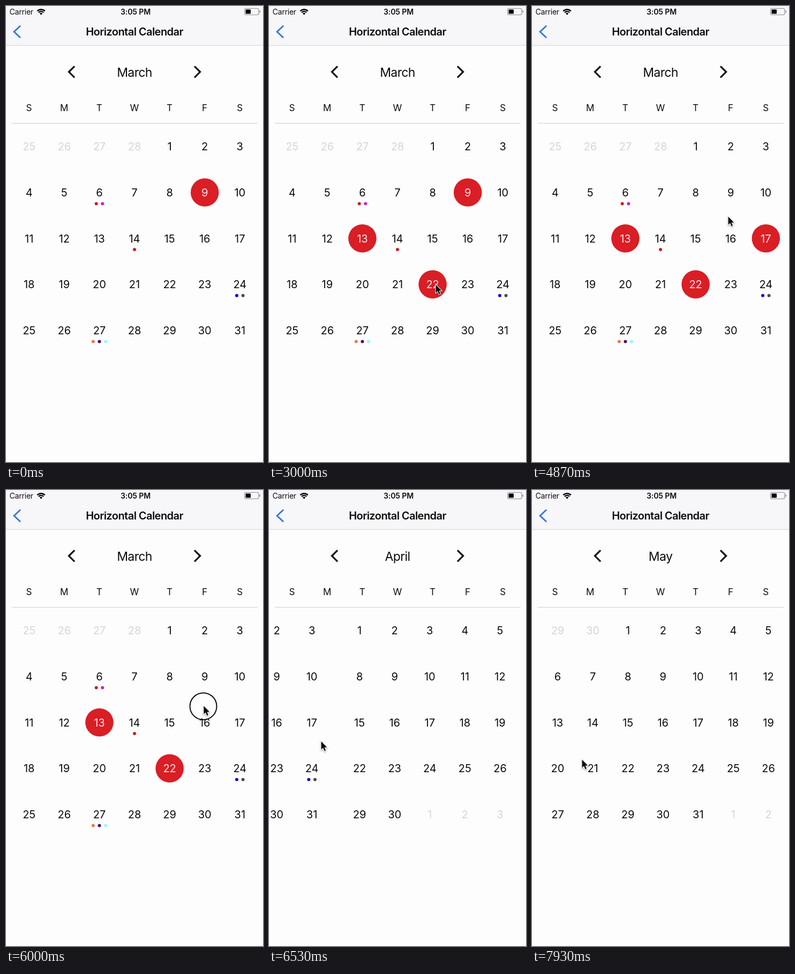
Recreate the animation shown at these times as an HTML page with a canvas. Size 480 by 850 pixels, loop 8 s.

```html
<!DOCTYPE html>
<html lang="en">
<head>
<meta charset="utf-8">
<title>Horizontal Calendar</title>
<style>
  html, body { margin: 0; width: 100%; height: 100%; overflow: hidden; background: #fefdfe; }
  canvas { display: block; }
</style>
</head>
<body>
<canvas id="stage" width="480" height="850"></canvas>
<script>
const ctx = document.getElementById('stage').getContext('2d');
const LOOP = 8000, PAGE = 482.6, COL = 65.6, ROW = 85.7, SETTLE = 84;
const RED = '#d91e25';

const months = [
  { name: 'March', first: 4, days: 31, before: 28 },
  { name: 'April', first: 0, days: 30, before: 31 },
  { name: 'May', first: 2, days: 31, before: 30 },
];
const events = {
  6: ['#c91c22', '#c822c8'],
  14: ['#c91c22'],
  24: ['#0a0acb', '#4b4b4d'],
  27: ['#e47b4c', '#4d0a68', '#8ffcfc'],
};
// Selected days of March: [day, selected from, selected until]
const selections = [[9, 0, 4490], [13, 1890, LOOP], [22, 2740, LOOP], [17, 3670, 5370]];
const presses = [[1790, 1890], [2640, 2740], [3560, 3670], [4380, 4490], [5260, 5370], [5930, 6478], [7340, 7570]];
// Each swipe: release time, pointer x at which the page starts to follow, start time
const swipes = [
  { start: 5930, release: 6478, anchor: 355 },
  { start: 7340, release: 7570, anchor: 246 },
];
// Pointer path: time, x, y
const path = [
  [70, 404, 752], [870, 379, 348], [1000, 375, 348], [1130, 371, 348], [1270, 371, 348],
  [1750, 180, 434], [1950, 180, 434], [2580, 308, 517], [2800, 309, 518], [3000, 311, 519],
  [3500, 436, 436], [3720, 436, 436], [4330, 369, 350], [4730, 367, 352], [4870, 366, 392],
  [5220, 434, 434], [5400, 434, 434], [5860, 368, 402], [6000, 369, 402], [6100, 352, 406],
  [6300, 262, 428], [6478, 109, 464], [6530, 97, 468], [6640, 96, 469], [7260, 262, 477],
  [7370, 260, 478], [7470, 219, 480], [7570, 112, 492], [7700, 95, 500], [7930, 93, 502], [8000, 93, 502],
];

function pointerAt(t) {
  const i = path.findIndex(p => p[0] > t);
  const [t0, x0, y0] = path[i - 1], [t1, x1, y1] = path[i];
  let k = (t - t0) / (t1 - t0);
  if (t1 - t0 > 200) k = k * k * (3 - 2 * k);
  return { x: x0 + (x1 - x0) * k, y: y0 + (y1 - y0) * k };
}

// Distance scrolled: follows the pointer, then settles on the next page.
function swipeOffset({ start, release, anchor }, t) {
  if (t < start) return 0;
  const dragged = Math.max(0, anchor - pointerAt(Math.min(t, release)).x);
  if (t < release) return dragged;
  return PAGE - (PAGE - dragged) * Math.exp((release - t) / SETTLE);
}

function text(s, x, y, size, { weight = 400, color = '#0b0b0c', spacing = 0, align = 'center' } = {}) {
  ctx.font = `${weight} ${size}px Inter, sans-serif`;
  ctx.letterSpacing = spacing + 'px';
  ctx.textAlign = align;
  ctx.fillStyle = color;
  ctx.fillText(s, x, y + size * 0.364);
}

function disc(x, y, r, color) {
  ctx.fillStyle = color;
  ctx.beginPath();
  ctx.arc(x, y, r, 0, 7);
  ctx.fill();
}

function chevron(x, y, dx, dy, color, width) {
  ctx.strokeStyle = color;
  ctx.lineWidth = width;
  ctx.beginPath();
  ctx.moveTo(x + dx, y - dy);
  ctx.lineTo(x, y);
  ctx.lineTo(x + dx, y + dy);
  ctx.stroke();
}

function statusBar() {
  text('Carrier', 6.5, 11, 14, { align: 'left', spacing: -0.2 });
  text('3:05 PM', 242, 11, 14, { weight: 600, spacing: -0.1 });
  const a = -Math.PI / 2;
  ctx.strokeStyle = '#000';
  ctx.lineWidth = 2.3;
  for (const r of [6.3, 10]) {
    ctx.beginPath();
    ctx.arc(65.5, 16.5, r, a - 0.8, a + 0.8);
    ctx.stroke();
  }
  ctx.fillStyle = '#000';
  ctx.beginPath();
  ctx.moveTo(65.5, 16.8);
  ctx.arc(65.5, 16.5, 3.6, a - 0.8, a + 0.8);
  ctx.fill();

  ctx.strokeStyle = '#8c8c8e';
  ctx.lineWidth = 1.1;
  ctx.beginPath();
  ctx.roundRect(445.5, 4.5, 26.5, 12, 3);
  ctx.stroke();
  ctx.fillStyle = '#8c8c8e';
  ctx.fillRect(473.3, 8.5, 1.6, 4);
  ctx.fillStyle = '#000';
  ctx.beginPath();
  ctx.roundRect(447.5, 6.4, 9.5, 8.2, 1);
  ctx.fill();
}

function header(title) {
  ctx.fillStyle = '#f7f6f9';
  ctx.fillRect(0, 0, 480, 73);
  ctx.fillStyle = '#d4d3d6';
  ctx.fillRect(0, 73, 480, 1);
  statusBar();
  chevron(15, 48, 12, 11.3, '#3478d8', 2.9);
  text('Horizontal Calendar', 240, 48, 20, { weight: 600, spacing: -0.55 });
  chevron(117.5, 122.8, 10.5, 10.5, '#111', 3.3);
  chevron(362.5, 122.8, -10.5, 10.5, '#111', 3.3);
  text(title, 240, 123.5, 23, { spacing: -0.6 });
  [...'SMTWTFS'].forEach((d, i) => text(d, 43 + i * COL, 190, 17));
  ctx.fillStyle = '#d3d3d6';
  ctx.fillRect(11, 218, 459, 1.2);
}

function page(index, left, t) {
  const { first, days, before } = months[index];
  for (let i = 0; i < 35; i++) {
    const x = left + 43.2 + (i % 7) * COL, y = 262 + Math.floor(i / 7) * ROW;
    const n = i - first + 1;
    if (n < 1 || n > days) {
      text(n < 1 ? n + before : n - days, x, y, 20, { color: '#d5d5d8' });
      continue;
    }
    const selected = index === 0 && selections.some(([d, from, to]) => d === n && t >= from && t < to);
    if (selected) disc(x, y - 0.2, 26.3, RED);
    text(n, x, y, 20, selected ? { color: '#fbe9ea' } : {});
    const dots = index === 0 && events[n] || [];
    dots.forEach((c, k) => disc(x + (k - (dots.length - 1) / 2) * 11.6, y + 20.7, 3, c));
  }
}

function pointer(t) {
  const { x, y } = pointerAt(t);
  if (presses.some(([from, to]) => t >= from && t < to)) {
    ctx.strokeStyle = '#0c0c0c';
    ctx.lineWidth = 2;
    ctx.beginPath();
    ctx.arc(x - 0.3, y + 1.2, 25, 0, 7);
    ctx.stroke();
  }
  ctx.save();
  ctx.translate(x, y);
  ctx.beginPath();
  [[0.5, 0.5], [0.5, 15.8], [4, 12.6], [6.6, 18.4], [9, 17.4], [6.6, 11.7], [11.2, 11.5]]
    .forEach(([px, py]) => ctx.lineTo(px, py));
  ctx.closePath();
  ctx.shadowColor = 'rgba(0,0,0,.35)';
  ctx.shadowBlur = 3;
  ctx.shadowOffsetY = 1.5;
  ctx.strokeStyle = '#fff';
  ctx.lineWidth = 2;
  ctx.stroke();
  ctx.shadowColor = 'transparent';
  ctx.fillStyle = '#0a0a0a';
  ctx.fill();
  ctx.restore();
}

function draw(t) {
  ctx.fillStyle = '#fefdfe';
  ctx.fillRect(0, 0, 480, 850);
  const offset = swipes.reduce((sum, s) => sum + swipeOffset(s, t), 0);
  // The title follows shortly after each release.
  const current = swipes.filter(s => t >= s.release + 45).length;
  header(months[current].name);
  months.forEach((m, i) => {
    const left = i * PAGE - offset;
    if (Math.abs(left) < 480) page(i, left, t);
  });
  if (t >= 70) pointer(t);
}

const began = performance.now();
function tick() {
  draw((performance.now() - began) % LOOP);
  requestAnimationFrame(tick);
}
tick();
</script>
</body>
</html>
```
